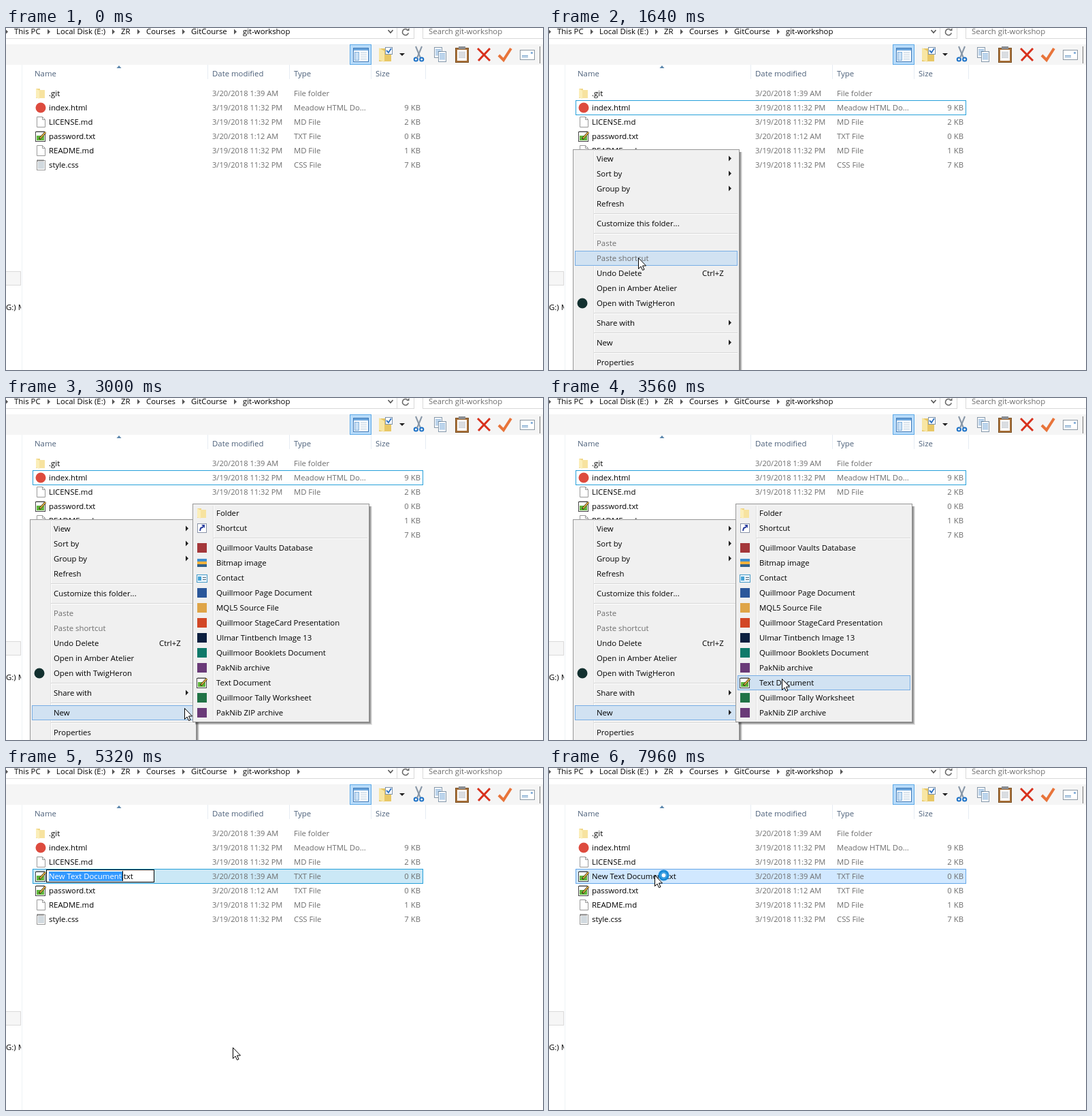
An HTML page with a canvas for the animation above (8 s loop, 789 by 502 pixels).

```html
<!DOCTYPE html>
<html lang="en">
<head>
<meta charset="utf-8">
<title>New text document</title>
<style>
html, body { margin: 0; width: 100%; height: 100%; overflow: hidden; background: #fff; }
canvas { display: block; }
</style>
</head>
<body>
<canvas id="stage" width="789" height="502"></canvas>
<script>
const ctx = document.getElementById('stage').getContext('2d');
const LOOP = 8000, TOP = 85, ROW = 21, ITEM = 22, GAP = 7, GUTTER = 30;
const GREY = '#6d6d6d', HEAD = '#4c607a', OFF = -99;
const OPEN = 1160, SUBMENU = 2480, CHOOSE = 3800, CREATE = 4040, EDIT = 4200, COMMIT = 7120, BUSY = 7960;

// name|size|date
const NEW = 3, STEM = 'New Text Document';
const files = ['.git||3/20/2018 1:39 AM', 'index.html|9 KB', 'LICENSE.md|2 KB',
  'password.txt|0 KB|3/20/2018 1:12 AM', 'README.md|1 KB', 'style.css|7 KB'];
const filesAfter = files.slice();
filesAfter.splice(NEW, 0, STEM + '.txt|0 KB|3/20/2018 1:39 AM');

const fileIcons = { git: 'folder', html: 'o#dd4b3e', md: 'page', txt: 'text', css: 'lines' };
const fileTypes = { git: 'File folder', html: 'Meadow HTML Do...' };

// label|icon|extra; '-' is a separator
const mainMenu = {
  x: 35, y: 178, w: 245,
  items: ['View||>', 'Sort by||>', 'Group by||>', 'Refresh', '-', 'Customize this folder...', '-',
    'Paste||off', 'Paste shortcut||off', 'Undo Delete||Ctrl+Z', 'Open in Amber Atelier',
    'Open with TwigHeron|o#12302f', '-', 'Share with||>', '-', 'New||>', '-', 'Properties']
};
const newMenu = {
  x: 274, y: 155, w: 260,
  items: ['Folder|folder', 'Shortcut|link', '-', 'Quillmoor Vaults Database|#a4373a', 'Bitmap image|image',
    'Contact|card', 'Quillmoor Page Document|#2b579a', 'MQL5 Source File|#dfa548',
    'Quillmoor StageCard Presentation|#d24726', 'Ulmar Tintbench Image 13|#0b1f3f',
    'Quillmoor Booklets Document|#0f7a6a', 'PakNib archive|#6a3a78', 'Text Document|text',
    'Quillmoor Tally Worksheet|#217346', 'PakNib ZIP archive|#6a3a78']
};

// Pointer moves: start, end, x, y, vertical bend
const START = [150, 428];
const moves = [
  [80, 760, 22, 185, -25], [760, 920, 35, 178, 0],
  [1280, 1920, 196, 446, 0], [2000, 2160, 196, 452, 0],
  [2760, 3120, 285, 456, 0], [3120, 3560, 342, 412, -35], [3800, 4120, 333, 410, 0],
  [6080, 6280, 246, 79, 0], [6400, 6520, 228, 137, 0], [6520, 6960, 234, 150, 37],
  [7360, 7760, 155, 157, 6]
];

function pointerAt(t) {
  let [x, y] = START;
  for (const [from, to, nx, ny, bend] of moves) {
    const f = Math.min(1, Math.max(0, (t - from) / (to - from)));
    const ease = f * f * (3 - 2 * f);
    x += (nx - x) * ease;
    y += (ny - y) * ease + bend * Math.sin(Math.PI * ease);
  }
  return [Math.round(x), Math.round(y)];
}

function box(x, y, w, h, fill, edge) {
  if (fill) { ctx.fillStyle = fill; ctx.fillRect(x, y, w, h); }
  if (edge) { ctx.strokeStyle = edge; ctx.lineWidth = 1; ctx.strokeRect(x + .5, y + .5, w - 1, h - 1); }
}
// Evenly spaced thin bars
function rules(x, y, w, n, color, step = 2) {
  for (let i = 0; i < n; i++) box(x, y + i * step, w, 1, color);
}
function paint(fill, edge, width = 1) {
  if (fill) { ctx.fillStyle = fill; ctx.fill(); }
  if (edge) { ctx.strokeStyle = edge; ctx.lineWidth = width; ctx.stroke(); }
}
function trace(x, y, pts) {
  ctx.beginPath();
  for (let i = 0; i < pts.length; i += 2) ctx.lineTo(x + pts[i], y + pts[i + 1]);
}
function poly(x, y, pts, fill, edge) {
  trace(x, y, pts);
  ctx.closePath();
  paint(fill, edge);
}
function line(x, y, pts, color, width = 1) {
  trace(x, y, pts);
  paint(null, color, width);
}
function arc(x, y, r, fill, edge, width, from = 0, to = 7) {
  ctx.beginPath();
  ctx.arc(x, y, r, from, to);
  paint(fill, edge, width);
}
// Draws a label and returns its width
function text(s, x, y, color = '#000', size = 11.4, align = 'left') {
  ctx.font = size + 'px "Open Sans", "Noto Sans", sans-serif';
  ctx.textAlign = align;
  ctx.fillStyle = color;
  ctx.fillText(s, x, y);
  return ctx.measureText(s).width;
}
const arrow = (x, y, color = '#222') => poly(x, y, [0, -4, 4, 0, 0, 4], color);

// 16 pixel icons
const icons = {
  folder(x, y) {
    box(x + 1, y + 1, 6, 14, '#f0d686');
    box(x + 5, y + 3, 9, 12, '#f7e3a0');
    poly(x, y, [1, 1, 6, 4, 6, 16, 1, 14], '#fbeeb9');
  },
  page(x, y) {
    poly(x + .5, y + .5, [2, 0, 10, 0, 14, 4, 14, 15, 2, 15], '#fff', '#999');
    line(x + .5, y + .5, [10, 0, 10, 4, 14, 4], '#999');
  },
  lines(x, y) {
    box(x + 2, y + 1, 13, 15, '#fafafa', '#999');
    rules(x + 4, y + 4, 9, 5, '#a9b9c4');
    for (let i = 3; i < 13; i += 2) box(x + i, y, 1, 3, '#777');
  },
  text(x, y) {
    box(x, y + 1, 15, 15, '#fff', '#444');
    box(x + 2, y + 7, 11, 7, '#5fb53a');
    for (let i = 2; i < 13; i += 2) box(x + i, y, 1, 2, '#555');
    line(x, y, [6, 12, 15, 2], '#3d2c14', 3);
    line(x, y, [7, 11, 15, 2], '#f2c14b', 1.5);
  },
  link(x, y) {
    box(x + 1, y + 1, 14, 14, '#fff', '#8a94a8');
    line(x, y, [5, 12, 6, 8, 10, 6], '#2b3f9e', 2);
    poly(x, y, [7, 3, 12, 3, 12, 8], '#2b3f9e');
  },
  image(x, y) {
    ['#3f8fd0', '#f0b23c', '#32608a'].forEach((c, i) => box(x + 1, y + 2 + i * 4, 14, 4, c));
  },
  card(x, y) {
    box(x, y + 3, 16, 12, '#e9f5fc', '#4a9cc7');
    box(x + 2, y + 6, 5, 6, '#45a3d6');
    rules(x + 9, y + 7, 5, 2, '#567', 3);
  }
};
function icon(kind, x, y) {
  if (kind[0] === '#') box(x + 1, y + 1, 14, 14, kind);
  else if (kind[0] === 'o') arc(x + 8, y + 8, 7.5, kind.slice(1));
  else icons[kind](x, y);
}

function drawTopBar(created) {
  for (const [x, w] of [[-2, 577], [574, 26], [612, 200]]) box(x, -9, w, 25, '#fff', '#d9d9d9');
  let x = 12;
  for (const s of ['This PC', 'Local Disk (E:)', 'ZR', 'Courses', 'GitCourse', 'git-workshop']) {
    arrow(x - 13, 5.5, '#555');
    x = Math.round(x + text(s, x, 9) + 23.4);
  }
  if (created) arrow(x - 13, 5.5, '#555');
  line(565, 5, [-3.5, -2, 0, 2, 3.5, -2], '#555', 1.6);
  arc(587, 6, 4.5, null, '#666', 1.5, .3, 5.3);
  poly(588, 0, [0, 4, 4.5, 4, 4.5, 0], '#666');
  text('Search git-workshop', 621, 9, GREY);
}

function drawToolbar() {
  box(0, 24, 789, 30, '#f5f5f5');
  // Pane button
  box(505, 24, 32, 30, '#b9dcfa', '#5ca9e8');
  box(510, 29, 23, 21, '#fff', '#3f78b5');
  box(511, 30, 21, 3, '#6ba5dd');
  box(512, 35, 7, 13, '#c9e0f5', '#86b2dc');
  rules(521, 36, 9, 4, '#b8cbdc', 3);
  // Folder options
  box(548, 30, 18, 19, '#e8c766');
  poly(548, 28, [0, 1, 8, 6, 8, 22, 0, 19], '#f8e6a4');
  box(557, 28, 11, 11, '#fff', '#7c93ac');
  line(557, 28, [2, 5, 5, 8, 9, 2], '#2a6fc0', 1.8);
  poly(578, 37, [0, 0, 8, 0, 4, 4], '#222');
  // Cut
  for (const side of [-1, 1]) {
    line(606.5, 27, [side * 4.5, 0, side * -2.5, 17], '#8796a6', 2);
    arc(606.5 + side * 4.2, 46, 2.6, null, '#1e73c8', 2);
  }
  // Copy
  for (const d of [0, 6]) {
    box(629 + d, 28 + d, 12, 16, '#fff', '#8497aa');
    rules(631 + d, 31 + d, 8, 5, '#79a9d8');
  }
  // Paste
  box(660, 29, 20, 22, '#a66f38', '#7d5227');
  box(663, 32, 14, 16, '#fff');
  rules(665, 35, 10, 5, '#b5bcc4');
  box(665, 27, 10, 4, '#8b8f95');
  // Delete, check, rename
  line(693, 30, [0, 0, 18, 18], '#d8301c', 3);
  line(693, 30, [18, 0, 1, 18], '#d8301c', 3);
  line(724, 29, [0, 11, 7, 18, 18, 1], '#e8743a', 4);
  box(755, 32, 22, 15, '#fff', '#8d98a3');
  rules(758, 40, 9, 2, '#6d9cc8');
  box(771, 35, 3, 3, '#8db4dc');
  box(784, 27, 1, 25, '#7a7a7a');
}

function drawSidebar(px, py) {
  box(23, 54, 1, 448, '#eef2f6');
  if (px >= 0 && px < 23 && py >= 168 && py < 189) box(-2, 168, 24, 21, '#e5f3fb', '#70c0e7');
  box(-2, 357, 24, 21, '#f6f6f6', '#dadada');
  ctx.save();
  ctx.beginPath();
  ctx.rect(0, 395, 22, 30);
  ctx.clip();
  text('G:) M', 0, 414);
  ctx.restore();
}

function drawHeader() {
  text('Name', 42, 71, HEAD);
  ['Date modified', 'Type', 'Size'].forEach((s, i) => {
    text(s, 303 + i * 120, 71, HEAD);
    box(296 + i * 120, 54, 1, 21, '#e6ecf3');
  });
  box(616, 54, 1, 21, '#e6ecf3');
  poly(162.5, 55, [0, 4, 3.5, 0, 7, 4], '#5b87ad');
}

const looks = {
  hover: ['#e5f3fb', '#70c0e7'], focus: [null, '#26a0da'],
  selected: ['#cbe8f6', '#26a0da'], hot: ['#d1e8ff', '#66a7e8']
};
function drawRow(file, i, look) {
  const y = TOP + i * ROW, base = y + 15;
  const [name, size, date = '3/19/2018 11:32 PM'] = file.split('|');
  const ext = name.split('.').pop();
  if (look) box(39, y, 574, 22, ...looks[look]);
  icon(fileIcons[ext], 43, y + 3);
  text(name, 63, base);
  text(date, 303, base, GREY, 11.1);
  text(fileTypes[ext] || ext.toUpperCase() + ' File', 423, base, GREY, 11.3);
  text(size, 609, base, GREY, 11.3, 'right');
}

function drawFiles(t, hover) {
  const created = t >= CREATE, list = created ? filesAfter : files;
  const lookOf = i => {
    if (created && i === NEW) return hover === i ? 'hot' : 'selected';
    if (hover === i) return 'hover';
    return i === 1 && t >= OPEN && !created ? 'focus' : '';
  };
  list.forEach((file, i) => drawRow(file, i, lookOf(i)));
  // The selected row lies over its neighbours' borders
  if (created) drawRow(list[NEW], NEW, lookOf(NEW));
}

function drawEditor(t) {
  const y = TOP + NEW * ROW;
  box(59, y + 1, 159, 19, '#fff', '#000');
  box(63, y + 4, 109, 14, '#3399ff');
  text('.txt', 63 + text(STEM, 63, y + 15, '#fff'), y + 15);
  if (t >= 4320 && (t - 4320) % 1000 < 560) box(171, y + 3, 1, 15, '#000');
}

const heightOf = item => item === '-' ? GAP : ITEM;

function drawShadow(x, y, w, h) {
  for (let i = 0; i < 4; i++) {
    const shade = `rgba(0,0,0,${.48 - i * .13})`;
    box(x + w + i, y + 4, 1, h + i - 4, shade);
    box(x + 4, y + h + i, w + i - 3, 1, shade);
  }
}

function drawMenu({ x, y, w, items }, alpha, px, py, open) {
  const h = items.reduce((sum, item) => sum + heightOf(item), 6);
  drawShadow(x, y, w, h);
  ctx.globalAlpha = alpha;
  box(x, y, w, h, '#f0f0f0', '#979797');
  box(x + GUTTER, y + 3, 1, h - 6, '#e0e0e0');
  box(x + GUTTER + 1, y + 3, 1, h - 6, '#fff');
  let top = y + 3;
  for (const item of items) {
    if (item === '-') {
      box(x + GUTTER + 1, top + 3, w - GUTTER - 4, 1, '#d7d7d7');
      box(x + GUTTER + 1, top + 4, w - GUTTER - 4, 1, '#fff');
    } else {
      const inside = px >= x && px < x + w && py >= top && py < top + ITEM;
      drawItem(x, w, item, top, inside || item.split('|')[0] === open);
    }
    top += heightOf(item);
  }
  ctx.globalAlpha = 1;
}

function drawItem(x, w, item, top, lit) {
  const [label, kind, extra] = item.split('|');
  if (lit) box(x + 3, top, w - 6, ITEM, '#d1e2f2', '#78aee5');
  if (kind) icon(kind, x + 6, top + 3);
  text(label, x + 35, top + 15, extra === 'off' ? GREY : '#000');
  if (extra === '>') arrow(x + 229, top + 10.5);
  else if (extra && extra !== 'off') text(extra, x + 190, top + 15);
}

function drawPointer(x, y, busy) {
  poly(x + .5, y + .5, [0, 0, 0, 16, 3.5, 12.5, 6, 18, 8.5, 17, 6, 11.5, 11, 11.5], '#fff', '#000');
  if (busy) {
    arc(x + 13.5, y + .5, 5.5, '#fff', '#1b8ad6', 5);
    arc(x + 13.5, y + .5, 4.5, null, '#63bdf0', 1);
  }
}

const fade = (t, start) => Math.min(1, (t - start + 120) / 240);

function draw(t) {
  const shown = t >= 80, menuOpen = t >= OPEN && t < CHOOSE, subOpen = t >= SUBMENU;
  const [px, py] = shown ? pointerAt(t) : [OFF, OFF];
  const hover = !menuOpen && px >= 39 && px < 613 ? Math.floor((py - TOP) / ROW) : -1;
  box(0, 0, 789, 502, '#fff');
  drawTopBar(t >= CREATE);
  drawToolbar();
  drawSidebar(px, py);
  drawHeader();
  drawFiles(t, hover);
  if (t >= EDIT && t < COMMIT) drawEditor(t);
  if (menuOpen) {
    const inSub = subOpen && px >= newMenu.x;
    drawMenu(mainMenu, fade(t, OPEN), inSub ? OFF : px, py, subOpen && 'New');
    if (subOpen) drawMenu(newMenu, fade(t, SUBMENU), px, py);
  } else if (t >= CHOOSE && t < CHOOSE + 200) {
    // The chosen item lingers briefly
    ctx.globalAlpha = 1 - (t - CHOOSE + 40) / 240;
    drawItem(newMenu.x, newMenu.w, 'Text Document|text', 407, true);
    ctx.globalAlpha = 1;
  }
  if (shown) drawPointer(px, py, t >= BUSY);
}

function tick() {
  const t = performance.now() % LOOP;
  draw(t - t % 40);
  requestAnimationFrame(tick);
}
tick();
</script>
</body>
</html>
```
